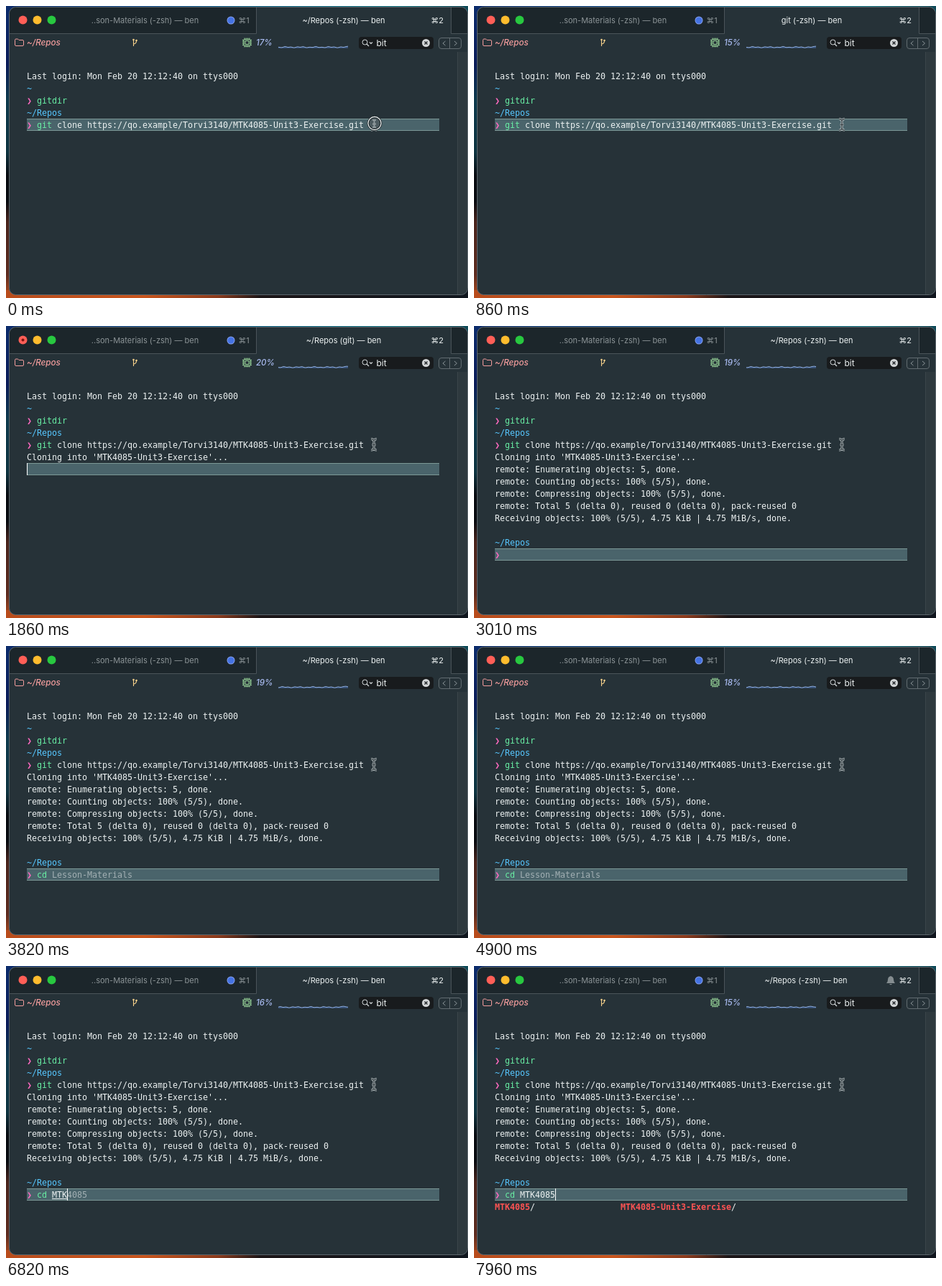
Recreate the animation shown at these times as an HTML page with a canvas. Size 643 by 407 pixels, loop 8000 ms.

```html
<!DOCTYPE html>
<html lang="en">
<head>
<meta charset="utf-8">
<title>Terminal</title>
<style>
  html, body { margin: 0; width: 100%; height: 100%; overflow: hidden; background: #10151c; }
  canvas { display: block; }
</style>
</head>
<body>
<canvas id="stage" width="643" height="407"></canvas>
<script>
const ctx = document.getElementById('stage').getContext('2d');
const LOOP = 8000;
const MONO = '11.63px "DejaVu Sans Mono", monospace';
const UI = 'Inter, "DejaVu Sans", sans-serif';
const CELL = 7, ROW = 17, LEFT = 29, TOP = 89;

const C = {
  bg: '#263238', tab: '#1c262b', edge: '#4a5459', text: '#edf2f2', dim: '#8c9497',
  pink: '#ff6ac1', green: '#69f0a5', blue: '#57c7ff', red: '#ff5353',
  hint: '#a3b0b4', guide: '#4a646b', guideEdge: '#7c9896'
};

const COURSE = 'MTK4085';
const REPO = COURSE + '-Unit3-Exercise';
const FOLDER = 'Lesson-Materials';
const USER = 'ben';

// [start time, value]: the last entry already begun applies
const titles = [[0, '~/Repos (-zsh)'], [700, 'git (-zsh)'], [1350, '~/Repos (git)'], [2400, '~/Repos (-zsh)']];
const loads = [[0, 17], [480, 15], [1480, 20], [2440, 19], [4500, 18], [5500, 16], [7100, 15]];
const typing = [
  [0, '', ''],
  [3130, 'c', 'd ' + FOLDER],
  [3320, 'cd', ' ' + FOLDER],
  [3950, 'cd ', FOLDER],
  [5980, 'cd M', 'TK4085'],
  [6220, 'cd MT', 'K4085'],
  [6480, 'cd MTK', '4085'],
  [7620, 'cd ' + COURSE, '']
];
const CLONE_AT = 980, RUN_START = 1300, PROMPT_AT = 2330, RUN_END = 2400, BELL_AT = 7800;
const output = [
  [CLONE_AT, `Cloning into '${REPO}'...`],
  [2060, 'remote: Enumerating objects: 5, done.'],
  [2060, 'remote: Counting objects: 100% (5/5), done.'],
  [2130, 'remote: Compressing objects: 100% (5/5), done.'],
  [2130, 'remote: Total 5 (delta 0), reused 0 (delta 0), pack-reused 0'],
  [2200, 'Receiving objects: 100% (5/5), 4.75 KiB | 4.75 MiB/s, done.']
];

const at = (track, t) => track.filter(entry => entry[0] <= t).pop();

function rect(x, y, w, h, fill) {
  ctx.fillStyle = fill;
  ctx.fillRect(x, y, w, h);
}

function round(x, y, w, h, r, fill, stroke) {
  ctx.beginPath();
  ctx.roundRect(x, y, w, h, r);
  if (fill) { ctx.fillStyle = fill; ctx.fill(); }
  if (stroke) { ctx.strokeStyle = stroke; ctx.lineWidth = 1; ctx.stroke(); }
}

function disc(x, y, r, fill) {
  ctx.beginPath();
  ctx.arc(x, y, r, 0, Math.PI * 2);
  ctx.fillStyle = fill;
  ctx.fill();
}

function ring(x, y, r, color, width) {
  ctx.beginPath();
  ctx.arc(x, y, r, 0, Math.PI * 2);
  ctx.strokeStyle = color;
  ctx.lineWidth = width;
  ctx.stroke();
}

function stroke(d, color, width = 1) {
  ctx.strokeStyle = color;
  ctx.lineWidth = width;
  ctx.stroke(new Path2D(d));
}

function label(text, x, y, color, font = '11px', align = 'left') {
  ctx.font = `${font} ${UI}`;
  ctx.textAlign = align;
  ctx.fillStyle = color;
  ctx.fillText(text, x, y);
}

// Draws [text, color, bold] runs one after another on the character grid.
function line(row, ...runs) {
  let col = 0;
  ctx.textAlign = 'left';
  for (const [text, color = C.text, bold] of runs) {
    ctx.font = (bold ? 'bold ' : '') + MONO;
    ctx.fillStyle = color;
    ctx.fillText(text, LEFT + col * CELL, TOP + row * ROW + 13);
    col += text.length;
  }
}

function gradient(x, y, stops) {
  const g = ctx.createLinearGradient(0, 0, x, y);
  stops.forEach(([pos, color]) => g.addColorStop(pos, color));
  return g;
}

function wallpaper() {
  rect(0, 0, 643, 407, '#10151c');
  rect(0, 0, 643, 10, gradient(643, 0, [
    [0, '#0c2c6c'], [.3, '#0e4a8c'], [.55, '#126a8c'], [.85, '#167a86'], [1, '#0e4a58']]));
  rect(0, 0, 10, 407, gradient(0, 407, [
    [0, '#0c2c6c'], [.2, '#0b1c58'], [.32, '#0e3a4c'], [.5, '#0e3440'],
    [.58, '#080b10'], [.67, '#080b10'], [.74, '#4a241c'], [.92, '#5e2c20'], [1, '#b84c1c']]));
  rect(0, 396, 643, 11, gradient(643, 0, [
    [0, '#b84c1c'], [.3, '#c8541c'], [.46, '#8a3a1c'], [.55, '#1c1618'], [1, '#10161e']]));
}

function frame(t) {
  round(4.5, 1.5, 638, 401, 9, C.bg, '#5c666c');
  ctx.save();
  ctx.beginPath();
  ctx.roundRect(5, 2, 637, 400, 9);
  ctx.clip();
  rect(5, 2, 343, 36, C.tab);
  rect(620, 2, 23, 36, C.tab);
  stroke('M5 38.5H348.5V2M643 38.5H619.5V2', C.edge);
  rect(628, 64, 15, 340, '#2e393e');
  stroke('M628.5 64V402', '#3a454a');
  ctx.restore();

  ['#ff5f57', '#febc2e', '#28c840'].forEach((color, i) => disc(23.5 + 20 * i, 19.5, 6, color));
  if (t >= RUN_START && t < RUN_END) disc(23.5, 19.5, 2, '#7d1512');

  label(`..son-Materials (-zsh) — ${USER}`, 193.5, 24, C.dim, '11px', 'center');
  disc(313, 20, 5.5, '#8aa3ec');
  disc(313, 20, 4.6, '#4573e3');
  label('⌘1', 331, 24, C.dim, '11px', 'center');

  const bell = t >= BELL_AT;
  label(`${at(titles, t)[1]} — ${USER}`, bell ? 462 : 470, 24, C.text, '11px', 'center');
  label('⌘2', 600, 24, C.text, '11px', 'center');
  if (bell) {
    ctx.fillStyle = '#858d90';
    ctx.fill(new Path2D('M574 24Q576 22 576 19Q576 15 580 14Q584 15 584 19Q584 22 586 24ZM578 25H582Q580 27.5 578 25Z'));
  }
}

function loadGraph(t) {
  const level = x => {
    const u = x + t / 1000;
    return 57.4 - .4 * Math.sin(u * .31) - .4 * Math.sin(u * .73 + 1)
      - 1.6 * Math.exp(-(((u - 478) / 3) ** 2));
  };
  ctx.beginPath();
  ctx.moveTo(379, level(379));
  for (let x = 380; x <= 476; x++) ctx.lineTo(x, level(x));
  ctx.strokeStyle = '#a9c3ee';
  ctx.lineWidth = 1;
  ctx.stroke();
  ctx.lineTo(476, 59);
  ctx.lineTo(379, 59);
  ctx.fillStyle = 'rgba(72, 112, 180, .5)';
  ctx.fill();
}

function statusBar(t) {
  const salmon = '#f29c9c', mint = '#9fdf9f', gold = '#f5d08a';
  stroke('M12.5 54V47.5Q12.5 46 14 46H16.5L18 47.5H23Q24.5 47.5 24.5 49V54Q24.5 55.5 23 55.5H14Q12.5 55.5 12.5 54Z', salmon);
  label('~/Repos', 29, 55, salmon, 'italic 500 11.7px');

  stroke('M177.5 56V47M177.5 53Q181.5 52.5 181.5 48.5', gold, 1.1);
  [[177.5, 47], [181.5, 48]].forEach(([x, y]) => disc(x, y, 1.3, gold));

  round(331, 46.5, 9, 9, 1, null, mint);
  round(333, 48.5, 5, 5, 0, null, mint);
  for (let i = 0; i < 4; i++) {
    const p = 332 + i * 2.3;
    stroke(`M${p} 44.5V46M${p} 56V57.5M329 ${p - 284.5}H331M340 ${p - 284.5}H342`, mint);
  }
  label(at(loads, t)[1] + '%', 348, 55, '#a9bbf0', 'italic 500 11.5px');
  loadGraph(t);

  round(491, 43, 104, 17, 4, '#181b1d');
  ring(499.5, 50.5, 3.5, '#d5dadc', 1);
  stroke('M502 53L505 56M506 50.5L508 52.5L510 50.5', '#d5dadc', 1.2);
  label('bit', 515.5, 55.5, C.text, '12px');
  disc(584.5, 51.5, 5.5, '#d3d6d7');
  stroke('M582.5 49.5L586.5 53.5M586.5 49.5L582.5 53.5', '#202427', 1.3);

  round(602.5, 44.5, 31, 15, 3.5, null, '#626c71');
  stroke('M617.5 45V59', '#626c71');
  stroke('M611.5 49L608 52L611.5 55M624 49L627.5 52L624 55', '#8b9599');
}

function terminal(t) {
  const prompted = t >= PROMPT_AT;
  const shown = output.filter(([start]) => start <= t);
  const activeRow = prompted ? 13 : shown.length ? 5 + shown.length : 4;
  const top = TOP + activeRow * ROW;
  rect(LEFT, top, 574, ROW, C.guide);
  rect(LEFT, top, 574, 1, C.guideEdge);
  rect(LEFT, top + ROW - 1, 574, 1, C.guideEdge);

  const prompt = ['❯ ', C.pink];
  line(0, ['Last login: Mon Feb 20 12:12:40 on ttys000']);
  line(1, ['~', C.blue]);
  line(2, prompt, ['gitdir', C.green]);
  line(3, ['~/Repos', C.blue]);
  line(4, prompt, ['git', C.green], [` clone https://qo.example/Torvi3140/${REPO}.git`]);
  shown.forEach(([, text], i) => line(5 + i, [text]));

  const [keyTime, typed, hint] = at(typing, t);
  if (prompted) {
    line(12, ['~/Repos', C.blue]);
    line(13, prompt, [typed.slice(0, 2), C.green], [typed.slice(2)], [hint, C.hint]);
    if (typed.length > 3 && hint) rect(64, 324, (typed.length - 3) * CELL, 1, C.text);
  }
  if (t >= BELL_AT) {
    line(14, [COURSE, C.red, true], ['/'.padEnd(18)], [REPO, C.red, true], ['/']);
  }

  const blinkOn = Math.floor((t - Math.max(keyTime, PROMPT_AT)) / 500) % 2 === 0;
  const column = prompted ? 2 + typed.length : 0;
  if (shown.length && (blinkOn || !prompted)) rect(LEFT + column * CELL, top, 1, ROW, '#fff');
}

function pointer(t) {
  const beam = 'M508 157.5Q512 157.5 512 160.5V170Q512 173 508 173M516 157.5Q512 157.5 512 160.5M512 170Q512 173 516 173M509.5 165.5H514.5';
  stroke(beam, '#b9c2c4', 3);
  stroke(beam, '#394347', 1.3);

  // click ring, fading out
  const alpha = Math.max(0, Math.min(1, (320 - t) / 200));
  if (!alpha) return;
  ctx.save();
  ctx.globalAlpha = alpha;
  disc(513, 163.5, 9.5, '#4c5a5f');
  stroke('M510 159H515M512.5 159V169M510 169H515M510 164.5H515', '#8d989b', 2);
  ring(513, 163.5, 10, '#1d2528', 1);
  ring(513, 163.5, 9, '#f2f5f5', 1.3);
  ring(513, 163.5, 7.8, '#1d2528', 1);
  ctx.restore();
}

function draw() {
  const t = performance.now() % LOOP;
  wallpaper();
  frame(t);
  statusBar(t);
  terminal(t);
  pointer(t);
  requestAnimationFrame(draw);
}
draw();
</script>
</body>
</html>
```
